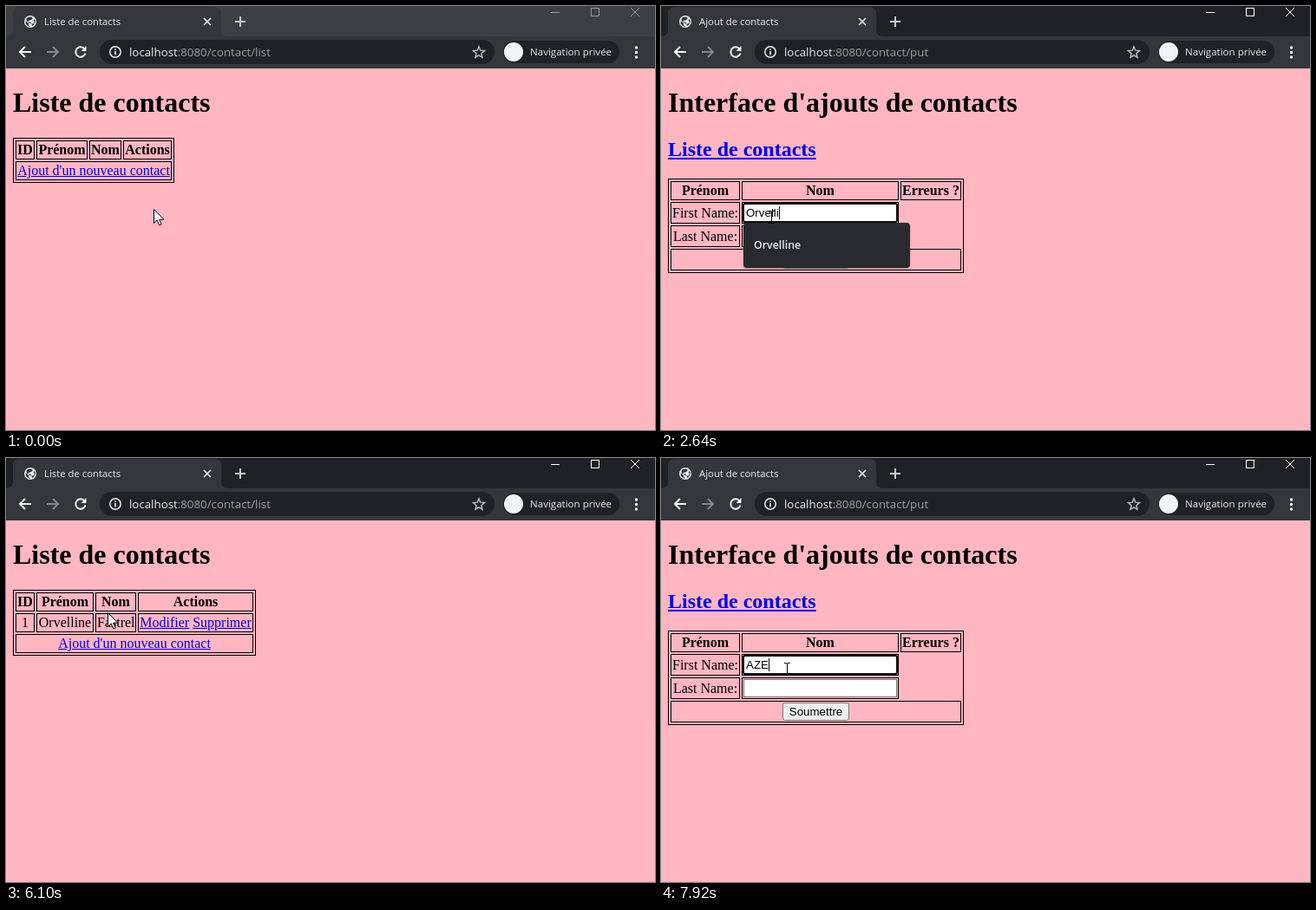
An HTML page that plays this animation: 748 by 489 pixels, repeating every 8000 ms.

```html
<!DOCTYPE html>
<html lang="fr">
<head>
<meta charset="utf-8">
<title>Contacts</title>
<style>
html, body { margin: 0; width: 100%; height: 100%; overflow: hidden; }
#stage { position: relative; width: 748px; height: 489px; overflow: hidden; background: #ffb6c1;
  font: 16px/18px "Liberation Serif", serif; color: #000; }
#stage > *, .page > * { position: absolute; margin: 0; white-space: nowrap; }
[hidden] { display: none !important; }
svg { overflow: visible; }
.ui { font-family: "Open Sans", "Noto Sans", sans-serif; color: #e8eaed; }
#bar { left: 0; top: 0; --strip: #202124; --win: #fff; }
#bar.blur { --strip: #3c4043; --win: #96989a; }
#bar text { fill: #e8eaed; }
.page { left: 0; top: 0; }
h1 { left: 8px; top: 93px; font-size: 32px; line-height: 37px; }
h2 { left: 8px; top: 152px; font-size: 24px; line-height: 27px; }
.link { color: #00e; text-decoration: underline; }
.active .add { color: #f00; }
table { left: 8px; table-layout: fixed; border: 1px solid #000; border-spacing: 2px; box-sizing: border-box; }
th, td { box-sizing: border-box; border: 1px solid #000; padding: 1px; height: 22px; text-align: center; }
.form td { height: 25px; }
.field { position: relative; box-sizing: border-box; width: 177px; height: 21px; padding-left: 2px;
  border: 1px solid #767676; background: #fff; text-align: left; font: 13.333px/19px "Liberation Sans", sans-serif; }
.field span { position: relative; display: inline-block; height: 19px; vertical-align: top; }
.focus { border-color: #fff; }
.focus::before { content: ""; position: absolute; inset: -2px; border: 2px solid #101010; border-radius: 3px; }
.focus span::after { content: ""; position: absolute; left: 100%; top: 2px; height: 15px; border-left: 1px solid #000; }
.button { box-sizing: border-box; width: 77px; height: 21px; margin: auto; border: 1px solid #767676; border-radius: 3px;
  background: #efefef; font: 13.333px/19px "Liberation Sans", sans-serif; }
.press .button { background: #e0e0e0; }
#menu { left: 95px; width: 192px; box-sizing: border-box; padding: 8px 12px; border-radius: 4px; background: #292a2d;
  box-shadow: 0 1px 2px #0005; font-size: 12.4px; font-weight: 600; line-height: 36px; }
#status { left: 0; bottom: 0; height: 22px; width: 154px; box-sizing: border-box; padding-left: 5px; border-radius: 0 4px 0 0;
  background: #35363a; color: #bdc1c6; font-size: 11.45px; line-height: 22px; }
#mouse { left: 0; top: 0; }
</style>
</head>
<body>
<div id="stage">
  <div class="page" id="list">
    <h1>Liste de contacts</h1>
    <table id="empty" style="top:152px;width:186px">
      <tr><th style="width:22px">ID<th style="width:59px">Prénom<th style="width:37px">Nom<th style="width:56px">Actions</tr>
      <tr><td colspan="4"><span class="link add">Ajout d'un nouveau contact</span></tr>
    </table>
    <table id="filled" style="top:152px;width:280px">
      <tr><th style="width:22px">ID<th style="width:66px">Prénom<th style="width:47px">Nom<th style="width:133px">Actions</tr>
      <tr><td>1<td>Orvelline<td>Fastrel<td><span class="link">Modifier</span> <span class="link">Supprimer</span></tr>
      <tr><td colspan="4"><span class="link add">Ajout d'un nouveau contact</span></tr>
    </table>
  </div>
  <div class="page" id="put">
    <h1>Interface d'ajouts de contacts</h1>
    <h2><span class="link">Liste de contacts</span></h2>
    <table class="form" style="top:199px;width:341px">
      <tr><th style="width:80px">Prénom<th style="width:181px">Nom<th style="width:70px">Erreurs ?</tr>
      <tr><td>First Name:<td><div class="field" id="first"><span></span></div></tr>
      <tr><td>Last Name:<td><div class="field" id="last"><span></span></div></tr>
      <tr><td colspan="3"><div class="button">Soumettre</div></tr>
    </table>
  </div>
  <div class="ui" id="menu"></div>
  <div class="ui" id="status"></div>

  <svg id="bar" class="ui" width="748" height="72" fill="none" stroke-width="2">
    <path fill="var(--strip)" d="M0 0H748V36H0Z"/>
    <path fill="#35363a" d="M0 35Q8 35 8 27V9Q8 1 16 1H240Q248 1 248 9V27Q248 35 256 35H748V72H0V35Z"/>
    <g id="globe">
      <circle cx="28" cy="18" r="7" fill="#e8eaed"/>
      <path fill="#35363a" d="M22.5 17L26 20V22L28 23.5 27 24 23 21ZM25 13L29 12.5 31 14 29 16 26 17 25 18.5 28 18.5 30 20.5 31.5 20.5 33 18 31.5 16.5 33 15 34 18 31 23 29.5 22 30 20.5 27.5 20 24 17.5 23.5 15Z"/>
    </g>
    <path id="spinner" stroke="#8ab4f8" d="M28 12A6 6 0 1 1 22 18"/>
    <text id="tab" x="44" y="22" font-size="11.35"></text>
    <path stroke="#e8eaed" stroke-width="1.6" d="M228 14l8 8m0-8l-8 8"/>
    <path stroke="#c8cacd" d="M264 18h12M270 12v12"/>
    <path stroke="var(--win)" stroke-width="1" d="M628 7.5h10M674.5 2.5h9v9h-9ZM720 2l10 10m0-10l-10 10"/>
    <path stroke="#f1f3f4" d="M29 53H16.5M22 47l-6 6 6 6"/>
    <path stroke="#85878a" d="M47 53H59.5M54 47l6 6-6 6"/>
    <path stroke="#f1f3f4" d="M90.5 49.5A5.7 5.7 0 1 0 91.5 54.5"/>
    <path fill="#f1f3f4" d="M92.5 46V52H86.5Z"/>
    <rect x="108" y="39" width="455" height="28" rx="14" fill="#202124"/>
    <circle cx="126" cy="53" r="6.2" stroke="#e8eaed" stroke-width="1.5"/>
    <path stroke="#e8eaed" stroke-width="1.6" d="M126 52v4.5M126 49.3v1.7"/>
    <text x="142" y="58" font-size="13.3">localhost<tspan id="path" style="fill:#9aa0a6"></tspan></text>
    <path stroke="#bdc1c6" stroke-width="1.4" d="M545 46.8L546.8 51.2 551.5 51.6 547.9 54.7 549 59.3 545 56.8 541 59.3 542.1 54.7 538.5 51.6 543.2 51.2Z"/>
    <rect x="573" y="40" width="134" height="26" rx="13" fill="#202124"/>
    <circle cx="585" cy="53" r="11" fill="#f1f3f4"/>
    <text x="604" y="57" font-size="11.55">Navigation privée</text>
    <path stroke="#f1f3f4" stroke-width="3.4" stroke-linecap="round" d="M726.5 48v.01M726.5 53.5v.01M726.5 59v.01"/>
  </svg>

  <svg id="mouse" width="1" height="1">
    <circle id="click" r="13" fill="#ffd700" fill-opacity=".65"/>
    <g stroke="#000" fill="#fff" stroke-linejoin="round">
      <path id="arrow" d="M.5 .5V16.5L4.2 13 6.8 18.8 9.2 17.8 6.7 12.2H11.8Z"/>
      <path id="hand" d="M-2.5 13V2Q-2.5 0 -.7 0 1 0 1 2V7.5Q3.8 6 4.4 8.5 7 7.2 7.6 9.3 10 8.5 10 11V15Q10 18 8 20V23H-1V20.5Q-4 17.5 -7.5 12.5 -7.5 9.8 -5 10.7ZM1 8v4M4.4 9v3M7.6 10v3"/>
      <path id="beam" fill="none" d="M-3 -5.5H-1Q.5 -5.5 .5 -4 .5 -5.5 2 -5.5H4M.5 -4V7M-3 8.5H-1Q.5 8.5 .5 7 .5 8.5 2 8.5H4"/>
    </g>
  </svg>
</div>
<script>
const LOOP = 8000;
const FIRST = 'Orvelline', LAST = 'Fastrel';
const ENTRIES = [FIRST, 'Prénom', 'Test', 'Essai', 'Contact', 'AZERTY'];
const $ = id => document.getElementById(id);

const initial = { page: 'list', filled: false, blur: true, cursor: 'arrow', x: 170, y: 234,
  first: '', last: '', focus: '', menu: [], status: '', click: false, active: false, press: false, load: false };

// Each step changes part of the state from its time on.
const steps = [
  [200, { cursor: 'hand', x: 160, y: 204 }],
  [400, { x: 150, y: 194, blur: false, click: true, active: true }],
  [600, { page: 'put', cursor: 'arrow', x: 138, y: 207, click: false, active: false }],
  [800, { x: 121, y: 224 }],
  [1020, { cursor: 'beam', x: 127, y: 242 }],
  [1220, { focus: 'first', menu: ENTRIES, click: true }],
  [1420, { click: false }],
  [1620, { first: FIRST.slice(0, 1), menu: [FIRST] }],
  [1820, { first: FIRST.slice(0, 2) }],
  [2040, { first: FIRST.slice(0, 3) }],
  [2240, { first: FIRST.slice(0, 4) }],
  [2440, { first: FIRST.slice(0, 5) }],
  [2640, { first: FIRST.slice(0, 7) }],
  [2840, { first: FIRST }],
  [3060, { focus: 'last', menu: [] }],
  [3260, { last: LAST.slice(0, 1), menu: [LAST] }],
  [3460, { last: LAST.slice(0, 2) }],
  [3660, { last: LAST.slice(0, 3) }],
  [3860, { last: LAST.slice(0, 5) }],
  [4060, { last: LAST, menu: [] }],
  [4480, { cursor: 'arrow', x: 142, y: 268 }],
  [4680, { x: 155, y: 284 }],
  [4880, { focus: '', press: true, click: true, load: true }],
  [5080, { press: false, click: false, load: false }],
  [5300, { x: 132, y: 222 }],
  [5500, { cursor: 'hand', x: 117, y: 178 }],
  [5700, { status: 'list', click: true }],
  [5900, { page: 'list', filled: true, cursor: 'arrow', status: '', click: false }],
  [6320, { x: 130, y: 196 }],
  [6520, { cursor: 'hand', x: 145, y: 211 }],
  [6720, { status: 'put' }],
  [6920, { x: 146, click: true, active: true }],
  [7120, { page: 'put', first: '', last: '', cursor: 'arrow', x: 145, y: 214, status: '', click: false, active: false }],
  [7320, { cursor: 'beam', x: 145, y: 242 }],
  [7520, { focus: 'first', menu: ENTRIES, click: true }],
  [7720, { first: 'A', menu: [], click: false }],
  [7920, { first: 'AZE' }]
];

function render(s) {
  const listing = s.page === 'list';
  const show = (id, on) => $(id).toggleAttribute('hidden', !on);
  show('list', listing);
  show('put', !listing);
  show('empty', !s.filled);
  show('filled', s.filled);
  show('globe', !s.load);
  show('spinner', s.load);
  show('click', s.click);
  show('status', s.status);
  show('menu', s.menu.length);
  for (const id of ['arrow', 'hand', 'beam']) show(id, id === s.cursor);
  for (const id of ['first', 'last']) {
    $(id).firstChild.textContent = s[id];
    $(id).classList.toggle('focus', s.focus === id);
  }
  $('bar').classList.toggle('blur', s.blur);
  $('list').classList.toggle('active', s.active);
  $('put').classList.toggle('press', s.press);
  $('tab').textContent = listing ? 'Liste de contacts' : 'Ajout de contacts';
  $('path').textContent = ':8080/contact/' + s.page;
  $('status').textContent = 'localhost:8080/contact/' + s.status;
  $('menu').style.top = (s.focus === 'last' ? 277 : 250) + 'px';
  $('menu').replaceChildren(...s.menu.map(name => {
    const row = document.createElement('div');
    row.textContent = name;
    return row;
  }));
  $('mouse').style.transform = `translate(${s.x}px, ${s.y}px)`;
}

const start = performance.now();
let shown = -1;
function tick() {
  const time = (performance.now() - start) % LOOP;
  const done = steps.filter(([at]) => at <= time);
  if (done.length !== shown) {
    shown = done.length;
    render(Object.assign({}, initial, ...done.map(([, change]) => change)));
  }
  requestAnimationFrame(tick);
}
tick();
</script>
</body>
</html>
```
